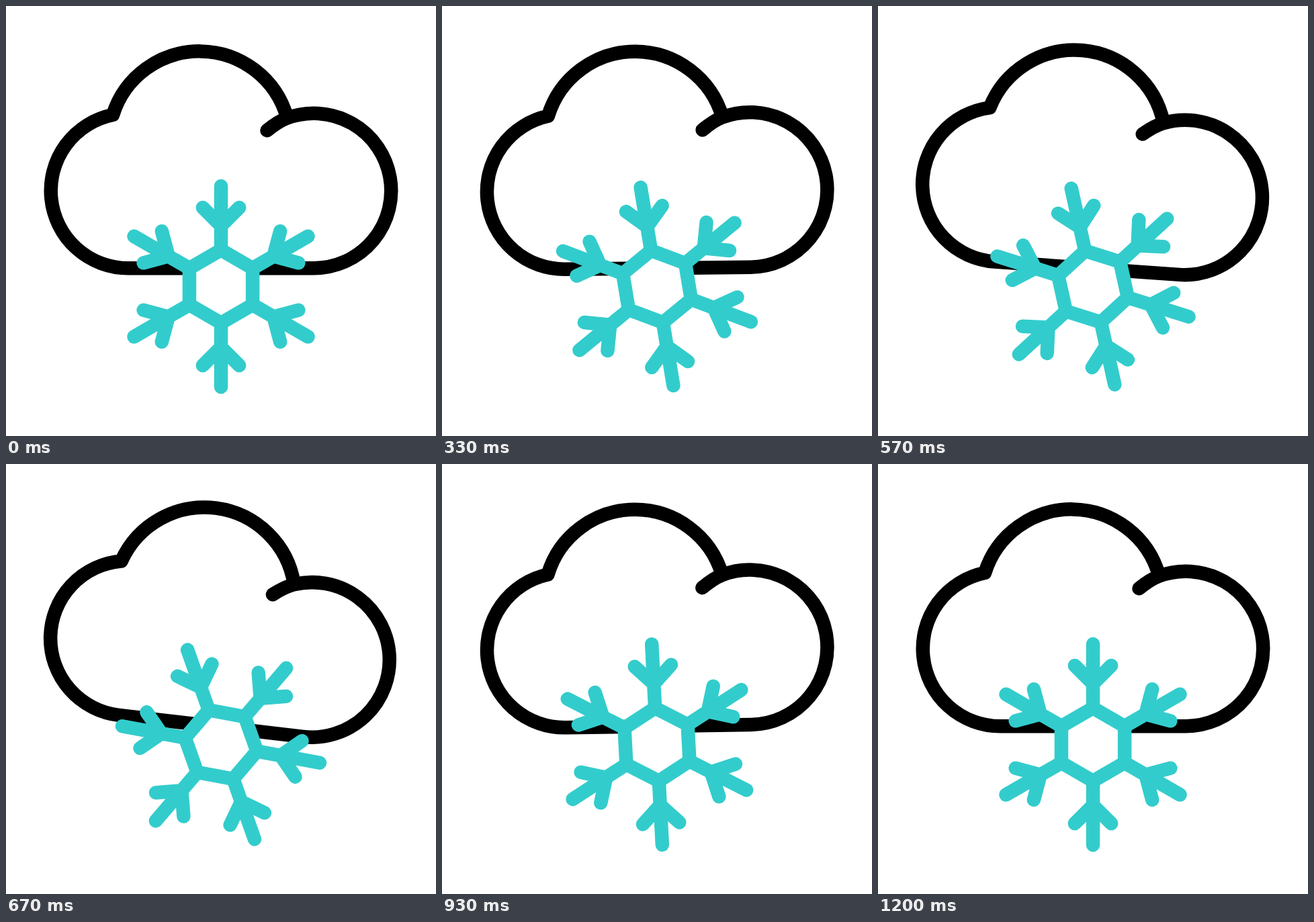
Animation, 640 px wide and 640 px high, one loop 1670 ms. Source, as an HTML page:

```html
<!DOCTYPE html>
<html lang="en">
<head>
<meta charset="utf-8">
<title>Snow cloud</title>
<style>
  html, body { margin: 0; width: 100%; height: 100%; overflow: hidden; background: #fff; }
  svg { display: block; width: 100vw; height: 100vh; }
  path { fill: none; stroke-width: 20.5; stroke-linecap: round; stroke-linejoin: round; }
  #cloud { stroke: #000; }
  #flake path { stroke: #3cc; }
  #flake .hex { fill: #fff; stroke-linejoin: miter; }
</style>
</head>
<body>
<svg viewBox="0 0 640 640">
  <path id="cloud" d="M418.3 166A135.3 135.3 0 0 0 159 162.07A115.25 115.25 0 0 0 182 390.25H458A115.25 115.25 0 1 0 418 166.9C407 171 397 178.4 388.5 185.3"/>
  <g id="flake"></g>
</svg>
<script>
const LOOP = 1670, LAST = 36;
const cloud = document.getElementById('cloud');
const flake = document.getElementById('flake');

// Six arms around a hexagon
const arm = a => `<path transform="rotate(${a})" d="M0-58V-149.5M-27.2-117.5L0-90.3L27.2-117.5"/>`;
flake.innerHTML = [0, 60, 120, 180, 240, 300].map(arm).join('') +
  '<path class="hex" d="M0-54.4L47.1-27.2V27.2L0 54.4L-47.1 27.2V-27.2Z"/>';

// Spin curve: step, angle, slope
const SPIN = [
  [0, 0, 4], [5, 40.5, 12], [14, 175.6, 16.6], [20, 280.5, 17.3],
  [23, 328.3, 12], [28, 357, 0.7], [36, 360, 0]
];

function spin(k) {
  const i = Math.max(1, SPIN.findIndex(p => p[0] >= k));
  const [k0, a, m] = SPIN[i - 1], [k1, b, n] = SPIN[i];
  const d = k1 - k0, u = (k - k0) / d, v = 1 - u;
  return a * v * v * (1 + 2 * u) + b * u * u * (3 - 2 * u) + d * u * v * (m * v - n * u);
}

// Damped swing after a sudden kick
function swing(k) {
  const t = k - 9.95;
  return t < 0 || k >= LAST ? 0 : -25.8 * Math.sin(0.502 * t) * Math.exp(-0.129 * t);
}

function draw(now) {
  const t = Math.floor(now % LOOP / 10) * 10;
  const k = Math.min(LAST, Math.floor((t + 5) * 0.03));
  cloud.setAttribute('transform', `rotate(${swing(k)} 316 262)`);
  flake.setAttribute('transform', `translate(320 417.5) rotate(${spin(k)})`);
}

let start;
function tick(now) {
  start ??= now;
  draw(now - start);
  requestAnimationFrame(tick);
}
draw(0);
requestAnimationFrame(tick);
</script>
</body>
</html>
```
